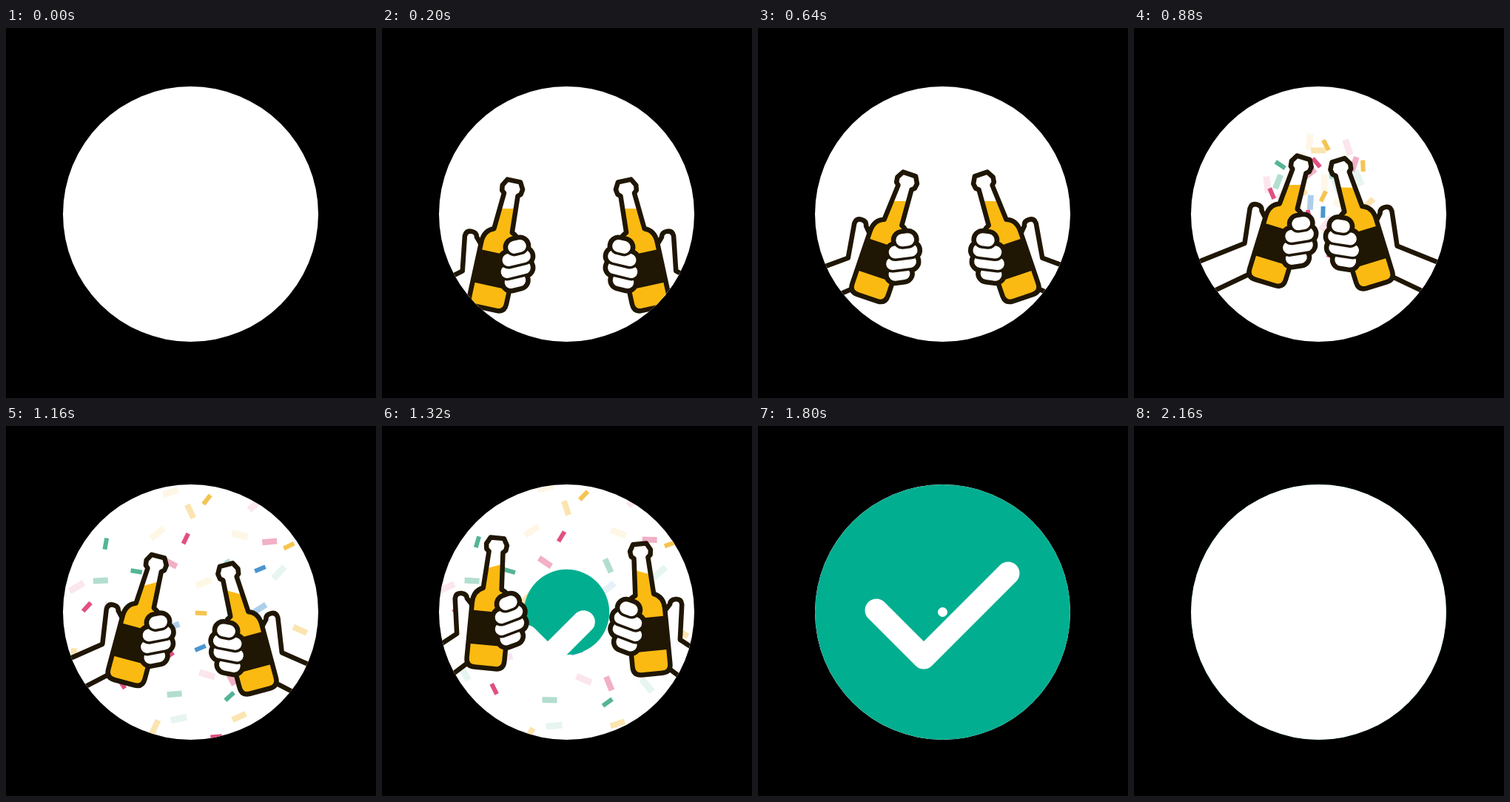
An HTML page with a canvas for the animation above (2.2 s loop, 500 by 500 pixels).

```html
<!DOCTYPE html>
<html lang="en">
<head>
<meta charset="utf-8">
<title>Cheers</title>
<style>
html, body { margin: 0; height: 100%; overflow: hidden; background: #000; }
canvas { display: block; }
</style>
</head>
<body>
<canvas id="stage" width="500" height="500"></canvas>
<script>
const ctx = document.getElementById('stage').getContext('2d');
const LOOP = 2200, CX = 249.5, CY = 251.5, R = 172.5, RAD = Math.PI / 180;
const INK = '#1f1604', BEER = '#fbba12', GREEN = '#02ae90', WHITE = '#fff';
const CLASH = 810, RECOIL = 1160, GONE = 1600;

const clamp = p => Math.max(0, Math.min(1, p));
const easeOut = p => Math.sin(p * Math.PI / 2);
const easeIn = p => 1 - Math.cos(p * Math.PI / 2);
const easeBoth = p => (1 - Math.cos(p * Math.PI)) / 2;
const span = (t, from, to, ease = easeBoth) => ease(clamp((t - from) / (to - from)));

// Key poses of a hand: time, x, y, angle, easing towards the pose
const handKeys = drop => [
  [0, 60, 470, 0],
  [360, 164, 356, 16, easeOut],
  [660, 146.5, 368, 18.8, easeBoth],
  [CLASH, 184, 346, 18, easeIn],
  [RECOIL, 159 + drop / 4, 350 + drop, 15, easeOut],
  [1480, 90, 284, -17, easeIn],
  [GONE, 20, 220, -38, easeOut]
];
const leftKeys = handKeys(0), rightKeys = handKeys(11.5);

function poseAt(keys, t) {
  const i = keys.findIndex(k => k[0] > t);
  const a = keys[i - 1], b = keys[i];
  const p = b[4]((t - a[0]) / (b[0] - a[0]));
  return [1, 2, 3].map(n => a[n] + (b[n] - a[n]) * p);
}

const arm = new Path2D('M-230 106L-42-46L-49-93Q-49-101-41-101Q-34-101-33-95L0-60V-7H-25L-241 191');
const bottle = new Path2D('M-9-180H9L14-171L13-164L9.5-161L12.5-111Q25.5-106 25.5-90V-15Q25.5-3.5 14-3.5H-14Q-25.5-3.5-25.5-15V-90Q-25.5-106-12.5-111L-9.5-161L-13-164L-14-171Z');
const fingerReach = [4, 11, 12, 6];

function line(color, width, ...pts) {
  ctx.strokeStyle = color;
  ctx.lineWidth = width;
  ctx.beginPath();
  for (let i = 0; i < pts.length; i += 2) ctx.lineTo(pts[i], pts[i + 1]);
  ctx.stroke();
}

function outline(path) {
  ctx.strokeStyle = INK;
  ctx.lineWidth = 6.5;
  ctx.stroke(path);
}

function finger(i, color, width) {
  const x = 23 + 2.5 * i, y = -94 + 15.4 * i, reach = fingerReach[i];
  const dx = reach * Math.cos(26 * RAD), dy = reach * Math.sin(26 * RAD);
  line(color, width, x - dx, y + dy, x + dx, y - dy);
}

function drawHand(keys, t) {
  const [x, y, angle] = poseAt(keys, t);
  const slosh = -15 * span(t, CLASH, RECOIL);
  ctx.save();
  ctx.translate(x, y);
  ctx.rotate(angle * RAD);
  ctx.fillStyle = WHITE;
  ctx.fill(arm);
  outline(arm);
  ctx.fill(bottle);

  ctx.save();
  ctx.clip(bottle);
  ctx.save();
  ctx.translate(0, -141.5);
  ctx.rotate((slosh - angle) * RAD);
  ctx.fillStyle = BEER;
  ctx.fillRect(-150, 0, 300, 250);
  ctx.restore();
  ctx.fillStyle = INK;
  ctx.fillRect(-40, -80, 80, 45.5);
  ctx.restore();
  outline(bottle);

  for (let i = 3; i >= 0; i--) finger(i, INK, 30);
  for (let i = 3; i >= 0; i--) {
    finger(i, INK, 24);
    finger(i, WHITE, 17);
  }
  ctx.restore();
}

function seeded(seed) {
  return () => (seed = seed * 16807 % 2147483647) / 2147483647;
}
const random = seeded(2024);
const colors = ['#4b96d1', '#f5c451', '#e05080', '#55b596'];
// Length, width and opacity, from near to far
const depths = [[15.5, 6, 1], [20, 8, .45], [22, 9, .14]];
const confetti = Array.from({ length: 46 }, (_, i) => {
  const dist = R * Math.sqrt((i + .3 + random() * .7) / 46);
  const dir = i * 2.4 + random() * .4;
  return {
    dx: dist * Math.cos(dir), dy: dist * Math.sin(dir), angle: random() * 180,
    color: colors[Math.floor(random() * 4)], depth: depths[i % 3]
  };
});
const burst = t => 1 - Math.exp(-(t - CLASH) / 130);

function drawConfetti(t) {
  if (t < CLASH || t > GONE) return;
  const spread = burst(t) / burst(RECOIL);
  const rise = 45 * (1 - spread);
  for (const { dx, dy, angle, color, depth: [len, wid, alpha] } of confetti) {
    ctx.save();
    ctx.globalAlpha = alpha;
    ctx.fillStyle = color;
    ctx.translate(CX + dx * spread, CY - rise + dy * spread);
    ctx.rotate((angle + spread * 120) * RAD);
    ctx.fillRect(-len / 2, -wid / 2, len, wid);
    ctx.restore();
  }
}

function disc(color, r) {
  ctx.fillStyle = color;
  ctx.beginPath();
  ctx.arc(CX, CY, r, 0, 7);
  ctx.fill();
}

function drawCheck(t) {
  const grow = span(t, 1270, 1470, easeOut);
  if (!grow) return;
  const extra = 10 * (1 - span(t, 1490, 1690));
  const a = (64 + extra) * grow, b = (114 + extra) * grow;
  line(WHITE, 31, 224 - a, 313 - a, 224, 313, 224 + b, 313 - b);
}

function mirror() {
  ctx.translate(506, 0);
  ctx.scale(-1, 1);
}

function draw(t) {
  ctx.fillStyle = '#000';
  ctx.fillRect(0, 0, 500, 500);
  ctx.save();
  ctx.lineCap = ctx.lineJoin = 'round';
  disc(WHITE, R);
  ctx.clip();
  drawConfetti(t);
  disc(GREEN, R * span(t, RECOIL, 1570));
  drawCheck(t);
  if (t < GONE) {
    drawHand(leftKeys, t);
    mirror();
    drawHand(rightKeys, t);
    mirror();
  }
  disc(WHITE, R * span(t, 1750, 2160));
  ctx.restore();
}

const start = performance.now();
function frame() {
  draw((performance.now() - start) % LOOP);
  requestAnimationFrame(frame);
}
frame();
</script>
</body>
</html>
```
